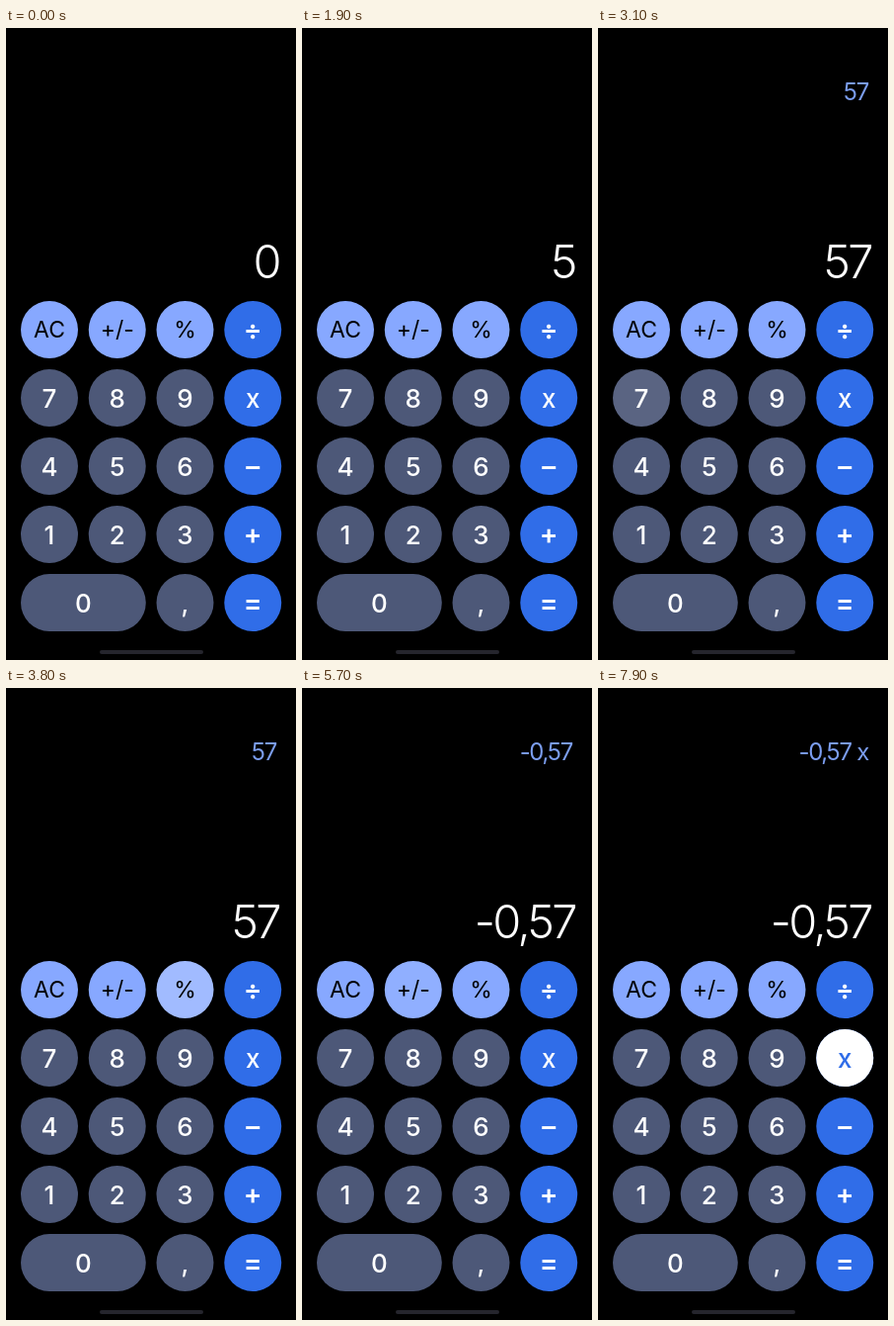
An HTML page for the animation above (8000 ms loop, 294 px wide and 639 px high).

```html
<!DOCTYPE html>
<html lang="en">
<head>
<meta charset="utf-8">
<title>Calculator</title>
<style>
  html, body { margin: 0; width: 100%; height: 100%; overflow: hidden; background: #000; }
  svg { display: block; width: 294px; height: 639px; }
  text { font-family: Inter, sans-serif; text-anchor: middle; }
  .digit { font-size: 26px; font-weight: 500; fill: #fff; }
  .tool { font-size: 23px; font-weight: 400; fill: #000; }
  .operator { font-size: 28px; font-weight: 600; fill: #fff; }
  .times { font-size: 26px; font-weight: 500; }
  .readout { text-anchor: end; letter-spacing: -0.055em; }
  #result { font-size: 47px; font-weight: 300; fill: #fff; }
  #history { font-size: 24px; fill: #7b9df0; }
</style>
</head>
<body>
<svg id="stage" viewBox="0 0 294 639">
  <rect width="294" height="639"/>
  <text id="history" class="readout" x="274" y="72.5"></text>
  <text id="result" class="readout" x="277" y="253"></text>
  <g id="keys"></g>
  <rect x="95" y="629" width="105" height="4" rx="2" fill="#25252d"/>
</svg>
<script>
const LOOP = 8000, STEP = 100;
const COLORS = { digit: "#4d5878", tool: "#87a8ff", operator: "#306de8" };
const ROWS = [
  ["AC", "+/-", "%", "÷"],
  ["7", "8", "9", "x"],
  ["4", "5", "6", "–"],
  ["1", "2", "3", "+"],
  ["0", null, ",", "="]
];
const TAPS = { "5": 1100, "7": 2600, "%": 3800, "+/-": 5200 };
const TIMES_TAP = 6900;
const RESULTS = [[0, "0"], [1700, "5"], [3100, "57"], [4300, "0,57"], [5500, "-0,57"]];
const HISTORY = [[0, ""], [2000, "5"], [3100, "57"], [4300, "0,57"], [5500, "-0,57"], [TIMES_TAP, "-0,57 x"]];

const byId = id => document.getElementById(id);
const clamp = v => Math.max(0, Math.min(1, v));
const keys = {};

function add(parent, tag, attrs, content = "") {
  const node = document.createElementNS("http://www.w3.org/2000/svg", tag);
  for (const name in attrs) node.setAttribute(name, attrs[name]);
  node.textContent = content;
  return parent.appendChild(node);
}

function addKey(label, row, col) {
  const kind = col === 3 ? "operator" : row === 0 ? "tool" : "digit";
  const width = label === "0" ? 126.8 : 58;
  const x = 15 + col * 68.75, y = 276 + row * 69;
  const shape = { x, y, width, height: 58, rx: 29 };
  const face = add(byId("keys"), "rect", { ...shape, fill: COLORS[kind] });
  const glow = add(byId("keys"), "rect", { ...shape, fill: "#fff", opacity: 0 });
  const baseline = y + (kind === "tool" ? 37.3 : 38.5);
  const text = add(byId("keys"), "text", {
    x: x + width / 2, y: baseline, class: kind + (label === "x" ? " times" : "")
  }, label);
  keys[label] = { face, glow, text };
}

ROWS.forEach((row, r) => row.forEach((label, c) => label && addKey(label, r, c)));

const valueAt = (track, t) => track.filter(([start]) => start <= t).pop()[1];

// Lit at once on touch, held briefly, then faded out.
const glowAt = age => age < 0 ? 0 : 0.22 * clamp((650 - age) / 450);

function paintTimes(t) {
  const { face, glow, text } = keys.x;
  const active = t >= TIMES_TAP;
  face.setAttribute("fill", active ? "#5990ff" : COLORS.operator);
  glow.setAttribute("opacity", clamp((t - TIMES_TAP - 200) / 400));
  text.style.fill = active ? COLORS.operator : "#fff";
}

function draw(now) {
  const t = Math.floor(now % LOOP / STEP) * STEP;
  byId("result").textContent = valueAt(RESULTS, t);
  byId("history").textContent = valueAt(HISTORY, t);
  for (const label in TAPS) keys[label].glow.setAttribute("opacity", glowAt(t - TAPS[label]));
  paintTimes(t);
}

const origin = performance.now();
function tick() {
  draw(performance.now() - origin);
  requestAnimationFrame(tick);
}
tick();
</script>
</body>
</html>
```
